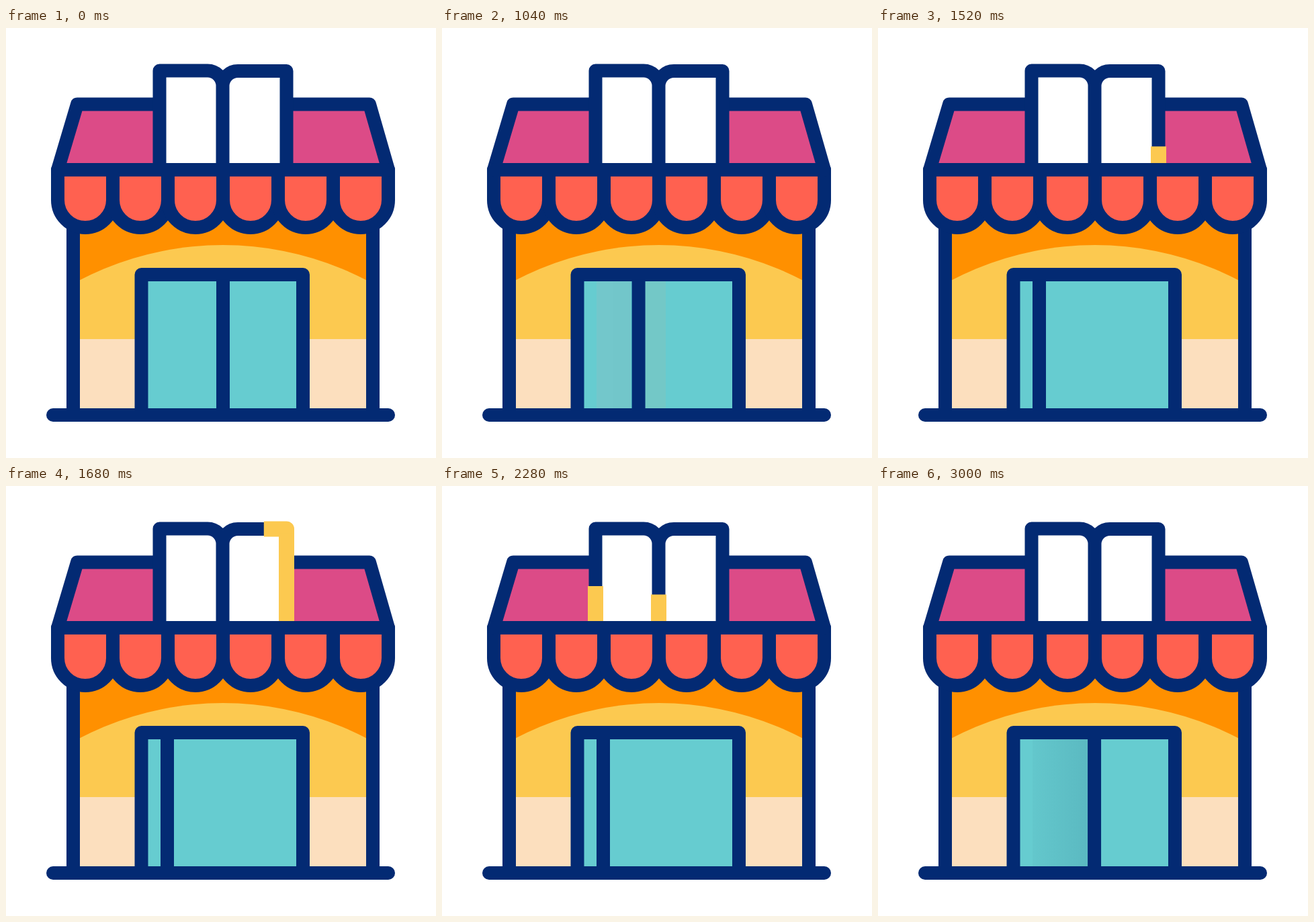
These frames come from a looping animation (640x640 px, 3040 ms). An HTML page:

```html
<!DOCTYPE html>
<html lang="en">
<head>
<meta charset="utf-8">
<title>Book shop</title>
<style>
  html, body { margin: 0; width: 100%; height: 100%; overflow: hidden; background: #fff; }
  svg { display: block; width: 100%; height: 100%; }
  .line { fill: none; stroke: #032a73; stroke-width: 20; stroke-linecap: round; stroke-linejoin: round; }
  .butt { stroke-linecap: butt; }
  .glow { fill: none; stroke: #fcc950; stroke-width: 23; stroke-linejoin: round; }
</style>
</head>
<body>
<svg viewBox="0 0 640 640">
  <defs>
    <linearGradient id="shade">
      <stop offset="0" stop-color="#63c7cc"/>
      <stop offset="1" stop-color="#5ab8c0"/>
    </linearGradient>
    <clipPath id="wall"><rect x="105" y="280" width="436" height="290"/></clipPath>
  </defs>

  <!-- front wall -->
  <g clip-path="url(#wall)">
    <rect x="100" y="280" width="446" height="290" fill="#ff9000"/>
    <circle cx="323" cy="785" r="462" fill="#fcc950"/>
    <rect x="100" y="463" width="446" height="110" fill="#fcdfbe"/>
  </g>
  <path class="line butt" d="M100 290V576M546 290V576"/>

  <!-- sliding door -->
  <rect x="202" y="367" width="240" height="205" fill="#66ccd0"/>
  <g id="openTrail">
    <rect x="230" y="377" width="51" height="190" fill="#a5b2b4"/>
    <rect id="farTrail" x="281" y="377" width="52" height="190" fill="#a6bba7"/>
  </g>
  <rect id="closeTrail" x="230" y="377" height="190" fill="url(#shade)"/>
  <path id="door" class="line butt" d="M0 367V576"/>
  <path class="line" d="M201.5 576V367H442V576"/>
  <path class="line" d="M70 576H569"/>

  <!-- roof -->
  <path d="M77 211L106 113.5H541L569 211Z" fill="#dc4b87"/>
  <path class="line" d="M77 211L106 113.5H541L569 211"/>

  <!-- book sign -->
  <path d="M228.5 211V63.5H300Q322 64 322.5 86Q323 64 345 63.5H417.5V211Z" fill="#fff"/>
  <path class="line" d="M228.5 211V63.5H300A22.5 22.5 0 0 1 322.5 86V211M417.5 211V64H345A22.5 22.5 0 0 0 322.5 86"/>
  <path class="glow" pathLength="1" d="M417.5 202V64H345Q330 64 322.5 74Q315 64 300 63.5H228.5V202"/>
  <path class="glow" pathLength="1" d="M417.5 202V64H345A22.5 22.5 0 0 0 322.5 86V202"/>

  <!-- awning -->
  <g id="awning"></g>
  <path class="line" d="M77 211H569"/>
</svg>
<script>
  const LOOP = 3040, STEP = 40;
  const SHUT = 323, OPEN = 240;
  const $ = id => document.getElementById(id);
  const clamp = v => Math.max(0, Math.min(1, v));
  const ramp = (t, from, to) => clamp((t - from) / (to - from));
  const ease = (t, from, to) => {
    const u = ramp(t, from, to);
    return u * u * (3 - 2 * u);
  };

  const flaps = Array.from({ length: 6 }, (_, i) => {
    const x = 77 + 82 * i;
    return `<path class="line" fill-rule="nonzero" style="fill:#ff6150"
      d="M${x} 211V256a41 41 0 0 0 82 0V211"/>`;
  });
  $("awning").innerHTML = flaps.join("");

  const glows = document.querySelectorAll(".glow");

  function draw(t) {
    const shift = ease(t, 720, 1500) - ease(t, 2400, 3040);
    const x = SHUT + (OPEN - SHUT) * shift;
    $("door").setAttribute("transform", `translate(${x} 0)`);

    // faint trails left by the door
    const fade = t < 1360 ? ramp(t, 1000, 1200) : 1 - ramp(t, 1360, 1440);
    $("openTrail").setAttribute("opacity", fade);
    const far = Math.max(281, x);
    $("farTrail").setAttribute("x", far);
    $("farTrail").setAttribute("width", Math.max(0, 333 - far));
    $("closeTrail").setAttribute("width", t > 2400 ? Math.max(0, x - 230) : 0);

    // light running along the book outline
    const head = ease(t, 1435, 2035), tail = ease(t, 1805, 2405);
    for (const g of glows) {
      g.style.display = head > tail ? "" : "none";
      g.setAttribute("stroke-dasharray", `0 ${tail} ${head - tail} 2`);
    }
  }

  const start = performance.now();
  function tick() {
    const t = (performance.now() - start) % LOOP;
    draw(Math.floor(t / STEP) * STEP);
    requestAnimationFrame(tick);
  }
  tick();
</script>
</body>
</html>
```
